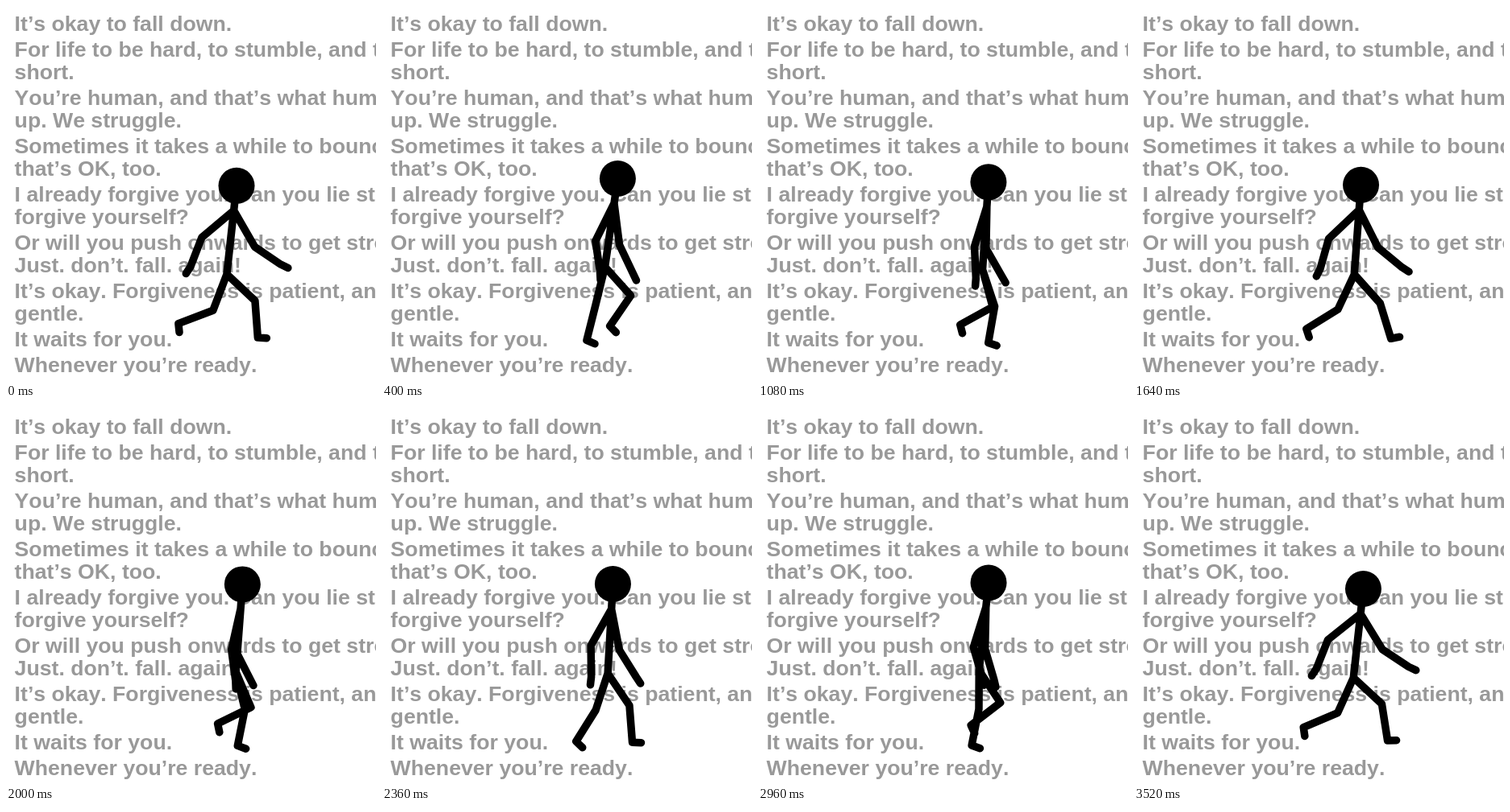
Write an HTML page that moves like this. It is 459 px wide and 466 px high and loops after 3560 ms.

```html
<!DOCTYPE html>
<html lang="en">
<head>
<meta charset="utf-8">
<title>Walking</title>
<style>
  html, body { margin: 0; width: 100%; height: 100%; overflow: hidden; background: #fff; }
  svg { display: block; }
  text { font: bold 26.67px "Liberation Sans", Arial, sans-serif; font-kerning: none; fill: #999; }
  path { fill: none; stroke: #000; stroke-width: 9.5; stroke-linecap: round; stroke-linejoin: round; }
</style>
</head>
<body>
<svg width="459" height="466" viewBox="0 0 459 466">
  <g id="words"></g>
  <path id="limbs"/>
  <circle id="head" r="22.5"/>
</svg>
<script>
const $ = id => document.getElementById(id);

// Each paragraph is a list of lines.
const paragraphs = [
  ["It’s okay to fall down."],
  ["For life to be hard, to stumble, and to", "short."],
  ["You’re human, and that’s what humans", "up. We struggle."],
  ["Sometimes it takes a while to bounce", "that’s OK, too."],
  ["I already forgive you. Can you lie still", "forgive yourself?"],
  ["Or will you push onwards to get stronger", "Just. don’t. fall. again!"],
  ["It’s okay. Forgiveness is patient, and", "gentle."],
  ["It waits for you."],
  ["Whenever you’re ready."],
];
let baseline = 31;
for (const lines of paragraphs) {
  lines.forEach((line, i) => {
    $("words").innerHTML += `<text x="10.6" y="${baseline + 28 * i}">${line}</text>`;
  });
  baseline += 32 + 28 * (lines.length - 1);
}

const LOOP = 3560, CYCLE = LOOP / 2, FRAME = 40;
const radians = degrees => degrees * Math.PI / 180;
const wave = (amplitude, degrees) => amplitude * Math.cos(radians(degrees));

// Limb angles in degrees: 0 hangs straight down, positive swings forward.
const thighAngle = p => 13 + wave(37.4, p + 47) + wave(5.5, 2 * p - 90) + wave(8.7, 3 * p - 17);
const shinAngle = p => -27 + wave(39, p) + wave(12.3, 2 * p + 116) + wave(4.4, 3 * p + 122);
const upperArmAngle = p => -10 + wave(36, p + 31) + wave(9, 3 * p);
const forearmAngle = p => 17 + wave(35, p + 19) + wave(7.5, 3 * p);

const extend = ([x, y], length, degrees) =>
  [x + length * Math.sin(radians(degrees)), y + length * Math.cos(radians(degrees))];
const line = (...points) => "M" + points.join("L");

function leg(hip, phase, stride) {
  const shin = shinAngle(phase) * stride;
  const knee = extend(hip, 48, thighAngle(phase) * stride);
  const ankle = extend(knee, 46, shin);
  return line(hip, knee, ankle, extend(ankle, 11, 82 + 1.1 * shin));
}

function arm(shoulder, phase, stride) {
  const forearm = forearmAngle(phase) * stride;
  const elbow = extend(shoulder, 52, upperArmAngle(phase) * stride);
  const [x, y] = extend(elbow, 37, forearm);
  return line(shoulder, elbow, [x + 1, y + 2], extend(elbow, 49, forearm));
}

function draw(time) {
  const phase = 360 * time / CYCLE, opposite = phase + 180;
  // Every second step is a little shorter.
  const stride = .95 + wave(.05, phase);
  const sway = wave(4, phase - 70);
  const head = [286 + sway + wave(4, 2 * phase - 110), 219 + wave(4.5, 2 * phase + 15)];
  const hip = [276 + sway + wave(2, 2 * phase - 90) + wave(4, 4 * phase - 150),
    329 + wave(5, 2 * phase + 30)];
  const shoulder = head.map((v, i) => v + .28 * (hip[i] - v));

  $("limbs").setAttribute("d", line(head, hip)
    + leg(hip, phase, stride) + leg(hip, opposite, stride)
    + arm(shoulder, phase, stride) + arm(shoulder, opposite, stride));
  $("head").setAttribute("cx", head[0]);
  $("head").setAttribute("cy", head[1]);
}

function tick() {
  draw(Math.floor(performance.now() / FRAME) * FRAME % LOOP);
  requestAnimationFrame(tick);
}
tick();
</script>
</body>
</html>
```
